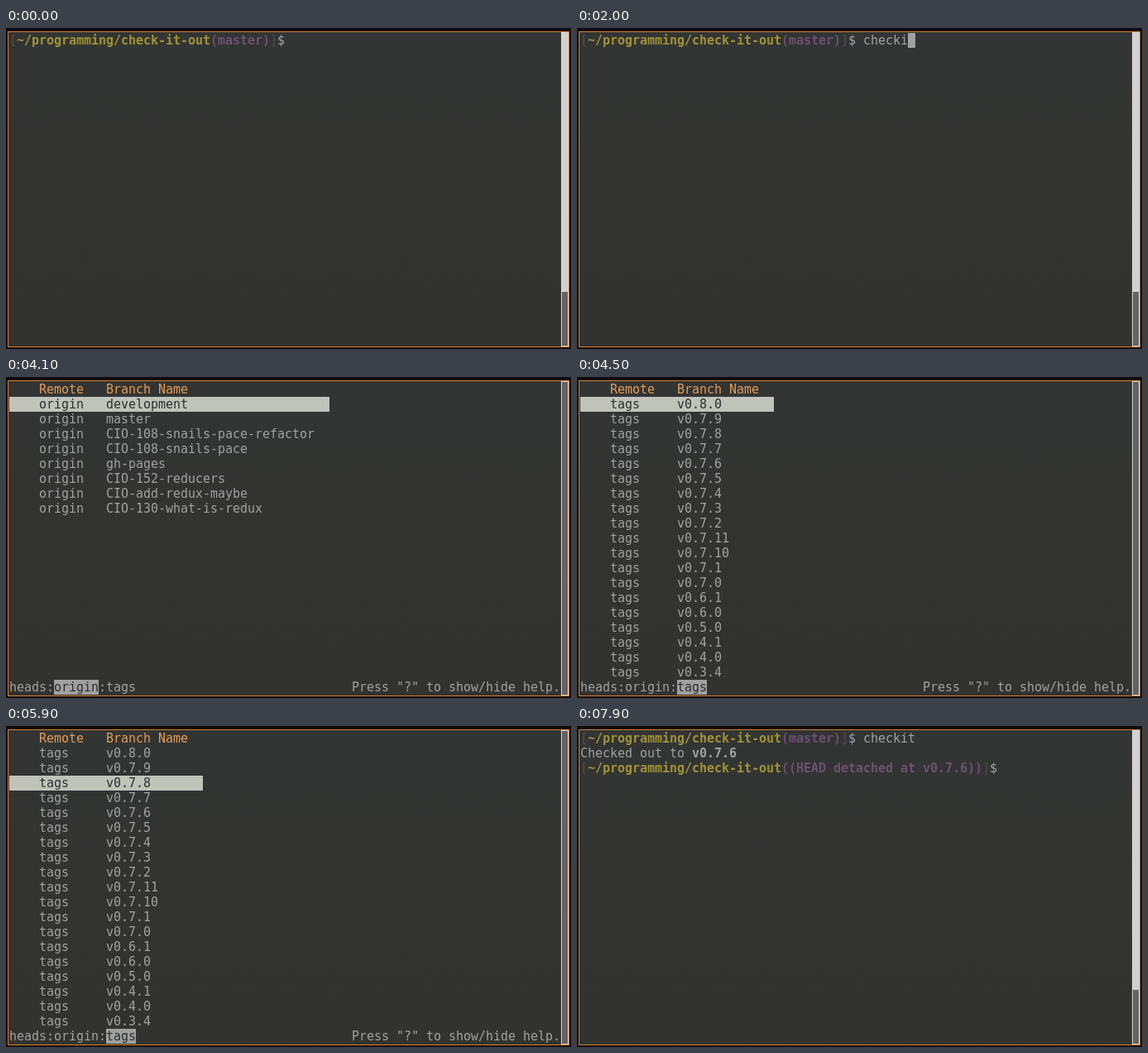
Write an HTML page with a canvas that moves like this. It is 683x388 px and loops after 8000 ms.

```html
<!DOCTYPE html>
<html lang="en">
<head>
<meta charset="utf-8">
<title>Terminal branch picker</title>
<style>
  html, body { margin: 0; width: 100%; height: 100%; overflow: hidden; background: #0b0b0d; }
  canvas { display: block; }
</style>
</head>
<body>
<canvas id="stage" width="683" height="388"></canvas>
<script>
const ctx = document.getElementById('stage').getContext('2d');
const LOOP = 8000;
const LEFT = 4, TOP = 6, CELL = 9, ROW = 18, BASELINE = 14;
const COLOR = {
  text: '#a0a1a0', dark: '#2d2f2f', path: '#9f9335', branch: '#6d5070',
  bracket: '#594a55', dollar: '#a5a4b0', header: '#e59c55',
  select: '#c0c3ba', cursor: '#a0a0a0', border: '#dc812c',
  trough: '#d2d1cf', thumb: '#636363'
};

const heads = ['development', 'CIO-test', 'master', 'CIO-108-snails-pace-refactor',
  'CIO-108-snails-pace', 'gh-pages', 'CIO-152-reducers', 'CIO-add-redux-maybe',
  'CIO-130-what-is-redux'];
const views = {
  heads: { names: heads, width: 43, current: 'master' },
  origin: { names: heads.filter(name => name !== 'CIO-test'), width: 43 },
  tags: {
    names: ['8.0', '7.9', '7.8', '7.7', '7.6', '7.5', '7.4', '7.3', '7.2', '7.11',
      '7.10', '7.1', '7.0', '6.1', '6.0', '5.0', '4.1', '4.0', '3.4'].map(v => 'v0.' + v),
    width: 26
  }
};

const command = 'checkit';
const keyTimes = [800, 1100, 1300, 1400, 1700, 2000, 2300];
const downTimes = [5400, 5900, 6300, 6600];
const countPassed = (times, t) => times.filter(time => t >= time).length;

function fillCells(col, row, width, color) {
  ctx.fillStyle = color;
  ctx.fillRect(LEFT + col * CELL, TOP + row * ROW, width * CELL, ROW);
}

// Draws text on the character grid and returns the next column.
function write(text, col, row, color = COLOR.text, bold = false) {
  ctx.font = `${bold ? 'bold ' : ''}15px "DejaVu Sans Mono", monospace`;
  ctx.fillStyle = color;
  for (const char of text) {
    ctx.fillText(char, LEFT + col++ * CELL, TOP + row * ROW + BASELINE);
  }
  return col;
}

function drawWindow(thumbTop) {
  ctx.fillStyle = '#0b0b0d';
  ctx.fillRect(0, 0, 683, 388);
  const shade = ctx.createLinearGradient(0, 5, 0, 385);
  shade.addColorStop(0, '#323534');
  shade.addColorStop(0.55, '#333331');
  shade.addColorStop(1, '#323330');
  ctx.fillStyle = shade;
  ctx.fillRect(2, 4, 679, 382);
  ctx.fillStyle = COLOR.trough;
  ctx.fillRect(671, 5, 9, 380);
  ctx.fillStyle = COLOR.thumb;
  ctx.fillRect(672, thumbTop, 7, 384 - thumbTop);
  ctx.strokeStyle = COLOR.border;
  ctx.lineWidth = 1;
  ctx.strokeRect(2.5, 4.5, 678, 381);
}

function drawPrompt(row, branch) {
  let col = write('[', 0, row, COLOR.bracket);
  col = write('~/programming/check-it-out', col, row, COLOR.path, true);
  col = write(`(${branch})`, col, row, COLOR.branch, true);
  col = write(']', col, row, COLOR.bracket);
  return write('$', col, row, COLOR.dollar) + 1;
}

function drawShell(t) {
  drawWindow(319);
  const typed = command.slice(0, countPassed(keyTimes, t));
  let row = 0;
  let col = write(typed, drawPrompt(0, 'master'), 0);
  if (t >= 7300) {
    write('v0.7.6', write('Checked out to ', 0, 1), 1, COLOR.text, true);
    row = 2;
    col = drawPrompt(row, '(HEAD detached at v0.7.6)');
  } else if (t >= 2800) {
    row = 1;
    col = 0;
  }
  if (t >= 200 && t < 7900) fillCells(col, row, 1, COLOR.cursor);
}

function drawPicker(t) {
  drawWindow(6);
  const active = t < 4100 ? 'heads' : t < 4500 ? 'origin' : 'tags';
  const { names, width, current } = views[active];
  const selected = countPassed(downTimes, t);
  write('Remote', 4, 0, COLOR.header);
  write('Branch Name', 13, 0, COLOR.header);
  names.forEach((name, i) => {
    const row = i + 1;
    const color = i === selected ? COLOR.dark : COLOR.text;
    if (i === selected) fillCells(0, row, width, COLOR.select);
    if (name === current) write('*', 0, row, color);
    write(active, 4, row, color);
    write(name, 13, row, color);
  });

  let col = 0;
  for (const tab of Object.keys(views)) {
    if (col) col = write(':', col, 20);
    if (tab === active) fillCells(col, 20, tab.length, COLOR.cursor);
    col = write(tab, col, 20, tab === active ? COLOR.dark : COLOR.text);
  }
  write('Press "?" to show/hide help.', 46, 20);
}

const start = performance.now();
function frame() {
  const t = (performance.now() - start) % LOOP;
  if (t >= 2900 && t < 7300) drawPicker(t);
  else drawShell(t);
  requestAnimationFrame(frame);
}
frame();
</script>
</body>
</html>
```
